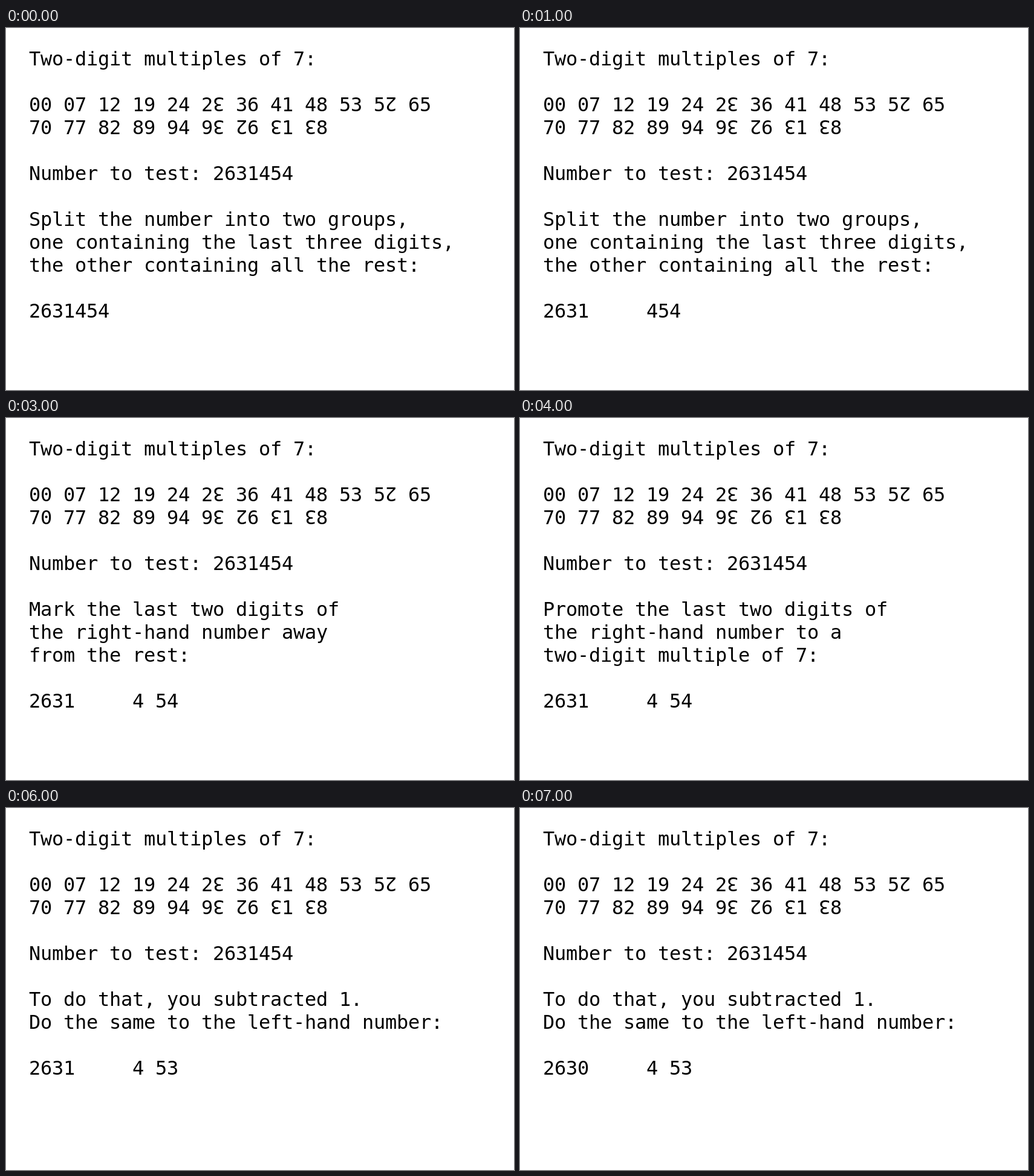
An HTML page that plays this animation: 840 px wide and 600 px high, repeating every 8 s.

```html
<!DOCTYPE html>
<html lang="en">
<head>
<meta charset="utf-8">
<title>Divisibility by seven in dozenal</title>
<style>
  html, body { margin: 0; width: 100%; height: 100%; overflow: hidden; background: #fff; }
  pre {
    position: absolute; left: 38px; top: 32px; margin: 0; color: #000;
    font: 32px/38px "DejaVu Sans Mono", monospace;
    letter-spacing: calc(19px - 1ch);
  }
  /* Dozenal ten and eleven are a 2 and a 3 turned upside down. */
  i { display: inline-block; height: 38px; vertical-align: top; font-style: normal;
      transform: rotate(180deg); transform-origin: 9.6px 18.3px; }
</style>
</head>
<body>
<pre id="board"></pre>
<script>
const board = document.getElementById("board");
const STEP = 1000;

const header = `Two-digit multiples of 7:

00 07 12 19 24 2E 36 41 48 53 5X 65
70 77 82 89 94 9E X6 E1 E8

Number to test: 2631454

`.replace(/X/g, "<i>2</i>").replace(/E/g, "<i>3</i>");

const split = `Split the number into two groups,
one containing the last three digits,
the other containing all the rest:`;
const mark = `Mark the last two digits of
the right-hand number away
from the rest:`;
const promote = `Promote the last two digits of
the right-hand number to a
two-digit multiple of 7:`;
const subtract = `To do that, you subtracted 1.
Do the same to the left-hand number:`;

const steps = [
  [split, "2631454"],
  [split, "2631     454"],
  [mark, "2631     454"],
  [mark, "2631     4 54"],
  [promote, "2631     4 54"],
  [promote, "2631     4 53"],
  [subtract, "2631     4 53"],
  [subtract, "2630     4 53"],
];

let shown = -1;
function draw(now) {
  const index = Math.floor(now / STEP) % steps.length;
  if (index !== shown) {
    shown = index;
    board.innerHTML = header + steps[index].join("\n\n");
  }
  requestAnimationFrame(draw);
}
draw(performance.now());
</script>
</body>
</html>
```
